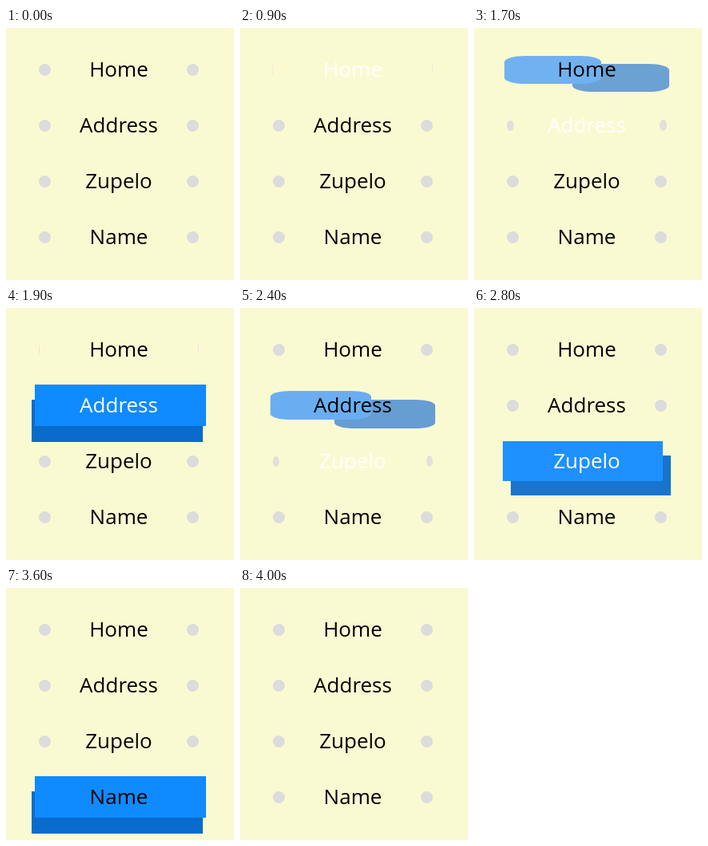
Write an HTML page that moves like this. It is 285 px wide and 316 px high and loops after 4.6 s.

```html
<!DOCTYPE html>
<html lang="en">
<head>
<meta charset="utf-8">
<title>Menu hover</title>
<style>
  html, body {
    margin: 0;
    width: 100%;
    height: 100%;
    overflow: hidden;
    background: #fafad2;
  }
  ul {
    position: absolute;
    left: 41px;
    top: 27px;
    margin: 0;
    padding: 0;
    list-style: none;
  }
  li {
    --p: 0;
    position: relative;
    width: 200px;
    height: 50px;
    margin-bottom: 20px;
    font: 26px/50px "Open Sans", "Noto Sans", sans-serif;
    text-align: center;
    color: #000;
  }
  li.on { color: #fff; }
  li span { position: relative; top: -1px; }

  /* --p runs from 0 (dot) to 1 (panel) and overshoots both ends */
  li::before, li::after {
    content: "";
    position: absolute;
    width: calc(15px + 185px * var(--p));
    height: calc(15px + 35px * var(--p));
    border-radius: calc(50% - 50% * var(--p));
  }
  li::before {
    right: calc(-5px * var(--p));
    top: 18px;
    background: rgb(calc(220 - 196 * var(--p)), calc(220 - 104 * var(--p)), calc(220 - 15 * var(--p)));
  }
  li::after {
    left: calc(-5px * var(--p));
    top: calc(18px - 18px * var(--p));
    background: rgb(calc(220 - 190 * var(--p)), calc(220 - 76 * var(--p)), calc(220 + 35 * var(--p)));
  }
  li span { z-index: 1; }
</style>
</head>
<body>
<ul>
  <li><span>Home</span></li>
  <li><span>Address</span></li>
  <li><span>Zupelo</span></li>
  <li><span>Name</span></li>
</ul>
<script>
  const LOOP = 4600, STEP = 100, DURATION = 500;

  // Pointer enter and leave times of each item, in ms
  const hovers = [[837, 1467], [1542, 2170], [2245, 2952], [2972, 3468]];
  const items = [...document.querySelectorAll("li")];

  const bezier = (a, b, s) =>
    3 * a * s * (1 - s) ** 2 + 3 * b * s * s * (1 - s) + s ** 3;

  // cubic-bezier(.68, -.55, .265, 1.55)
  function ease(x) {
    if (x <= 0) return 0;
    if (x >= 1) return 1;
    let lo = 0, hi = 1;
    for (let i = 0; i < 30; i++) {
      const mid = (lo + hi) / 2;
      if (bezier(0.68, 0.265, mid) < x) lo = mid;
      else hi = mid;
    }
    return bezier(-0.55, 1.55, lo);
  }

  function draw() {
    const t = Math.floor(performance.now() % LOOP / STEP) * STEP;
    items.forEach((item, i) => {
      const [enter, leave] = hovers[i];
      const on = t >= enter && t < leave;
      const p = t < leave
        ? ease((t - enter) / DURATION)
        : 1 - ease((t - leave) / DURATION);
      item.classList.toggle("on", on);
      item.style.setProperty("--p", p.toFixed(4));
    });
    requestAnimationFrame(draw);
  }
  draw();
</script>
</body>
</html>
```
